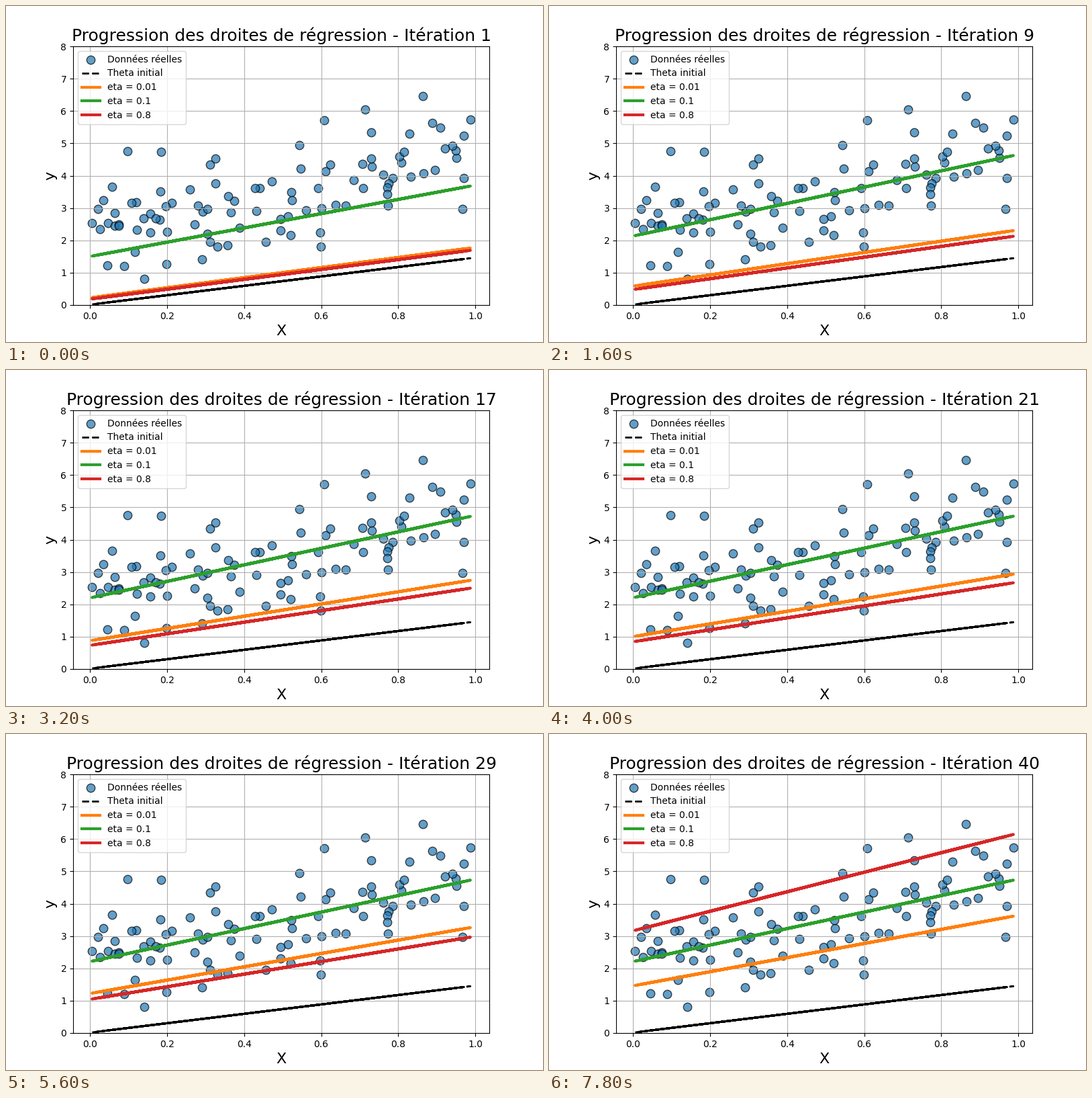
Animation of 800 by 500 pixels, one loop 8000 ms. Source, as a matplotlib script:

```python
import numpy as np
import matplotlib.pyplot as plt
from matplotlib.animation import FuncAnimation

ITERATIONS = 40
WARMUP = 3  # descent steps already taken before the first iteration shown
RATES = {0.01: "tab:orange", 0.1: "tab:green", 0.8: "tab:red"}

rng = np.random.RandomState(42)
x = rng.rand(100, 1)
y = 2 + 3 * x + rng.randn(100, 1)
theta0 = rng.randn(2, 1)
design = np.hstack([np.ones_like(x), x])


def descend(eta, steps):
    """Every theta met by batch gradient descent."""
    path = [theta0]
    for _ in range(steps):
        theta = path[-1]
        gradient = 2 / len(x) * design.T @ (design @ theta - y)
        path.append(theta - eta * gradient)
    return path


paths = {eta: descend(eta, ITERATIONS + WARMUP) for eta in RATES}

fig, ax = plt.subplots(figsize=(8, 5), dpi=100)
ax.scatter(x, y, s=80, alpha=0.7, edgecolors="k", label="Données réelles")
ax.plot(x, design @ theta0, "k--", lw=2, label="Theta initial")
lines = {
    eta: ax.plot(x, design @ theta0, color=color, lw=3, label=f"eta = {eta}")[0]
    for eta, color in RATES.items()
}
ax.set_ylim(0, 8)
ax.set_xlabel("X", fontsize=16)
ax.set_ylabel("y", fontsize=16)
ax.grid(True)
ax.legend(loc="upper left")


def update(frame):
    iteration = frame + 1
    for eta, line in lines.items():
        line.set_ydata(design @ paths[eta][iteration + WARMUP])
    ax.set_title(
        f"Progression des droites de régression - Itération {iteration}",
        fontsize=18,
    )
    return list(lines.values())


anim = FuncAnimation(fig, update, frames=ITERATIONS, interval=200,
                     repeat=True, repeat_delay=0)
plt.show()
```
